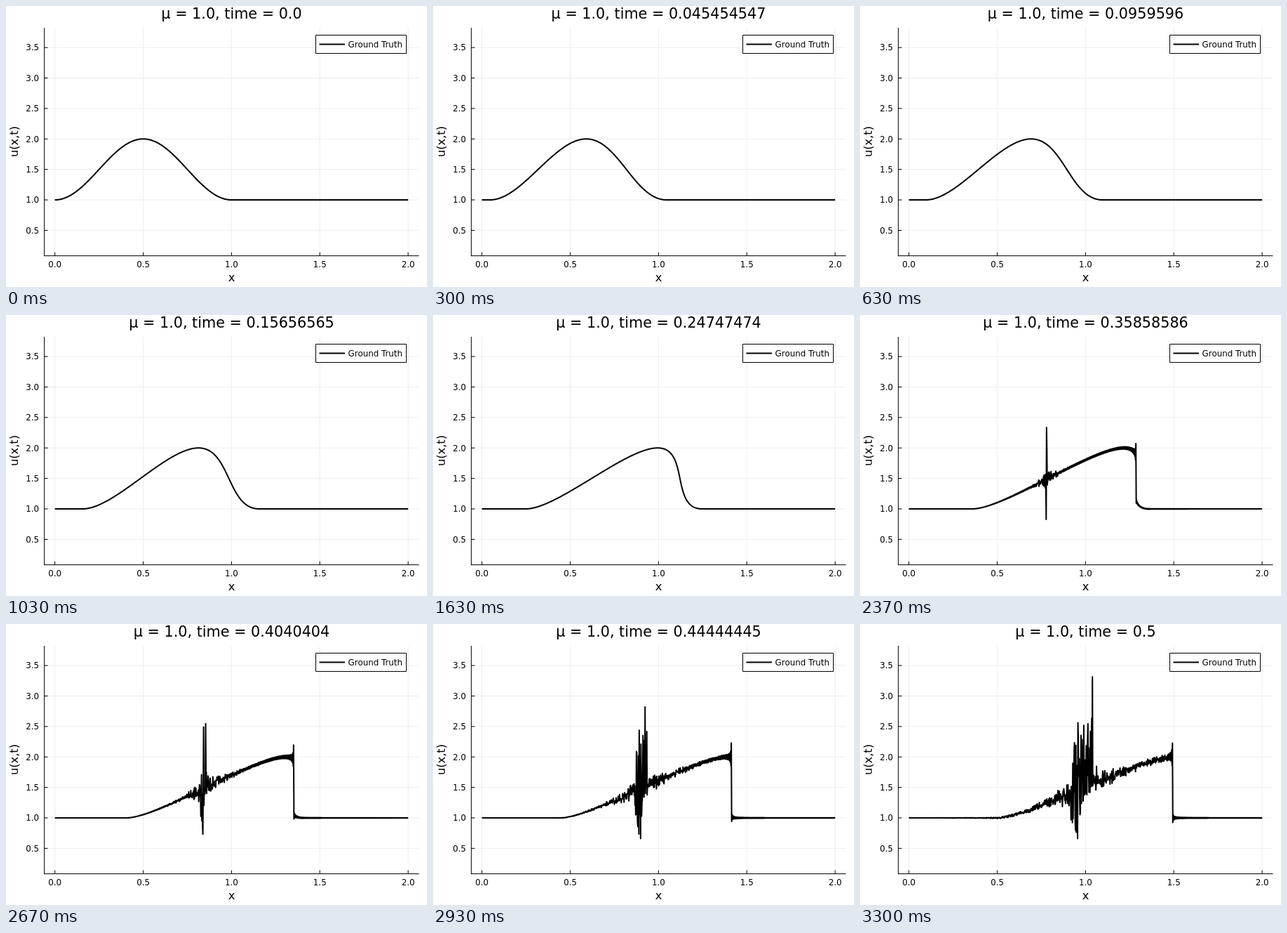
An HTML page with a canvas for the animation above (3330 ms loop, 600 by 400 pixels).

```html
<!DOCTYPE html>
<html lang="en">
<head>
<meta charset="utf-8">
<title>Inviscid wave steepening</title>
<style>
html, body { margin: 0; width: 100%; height: 100%; overflow: hidden; background: #fff; }
canvas { display: block; }
</style>
</head>
<body>
<canvas id="stage" width="600" height="400"></canvas>
<script>
const ctx = document.getElementById('stage').getContext('2d');
const LOOP = 3330, LAST = 99, SAMPLES = 1024;
const DX = 2 / SAMPLES, BREAK_TIME = 1 / Math.PI;
const BOX = { left: 54.6, right: 588.5, top: 31, bottom: 355.6 };

const px = x => 69.7 + 251.7 * x;
const py = u => 276 - 86.75 * (u - 1);

function line(x1, y1, x2, y2, color = '#000', width = 1) {
  ctx.strokeStyle = color;
  ctx.lineWidth = width;
  ctx.beginPath();
  ctx.moveTo(x1, y1);
  ctx.lineTo(x2, y2);
  ctx.stroke();
}

function label(text, x, y, size, align = 'center') {
  ctx.font = `${size}px "DejaVu Sans", sans-serif`;
  ctx.textAlign = align;
  ctx.fillStyle = '#000';
  ctx.fillText(text, x, y);
}

// Shortest decimal that still identifies the single-precision value.
function formatSingle(value) {
  const single = Math.fround(value);
  let digits = 1;
  while (Math.fround(+single.toPrecision(digits)) !== single) digits++;
  const text = String(+single.toPrecision(digits));
  return text.includes('.') ? text : text + '.0';
}

// Repeatable noise in [-1, 1].
function noise(i, seed) {
  const v = Math.sin(i * 12.9898 + seed * 78.233) * 43758.5453;
  return 2 * (v - Math.floor(v)) - 1;
}

const initial = x => x > 0 && x < 1 ? 1 + 0.5 * (1 - Math.cos(2 * Math.PI * x)) : 1;

// Burgers solution: follow the characteristic through x back to its foot.
function wave(x, t, shock) {
  let lo = x < shock ? x - 2 * t : 0.75;
  let hi = x < shock ? 0.75 : x - t;
  for (let i = 0; i < 40; i++) {
    const mid = (lo + hi) / 2;
    if (mid + initial(mid) * t < x) lo = mid; else hi = mid;
  }
  return initial((lo + hi) / 2);
}

// Ringing on both sides of the discontinuity, plus ripple along the hump.
function ringing(x, u, shock, jump) {
  const n = Math.floor(Math.abs(x - shock) / DX);
  const sign = n % 2 ? -1 : 1;
  if (x >= shock) return -sign * 0.075 * jump ** 2 / (1 + n) ** 0.65;
  const ripple = 0.016 * Math.min(1, 2 * (u - 1));
  return sign * jump * (0.23 / (1 + n) ** 0.9 + ripple);
}

// Unstable burst riding on the rising flank.
function makeBurst(t, s, frame) {
  const center = 0.242 + 1.5 * t - 0.018 * s * s;
  const half = 0.066 * s ** 1.7;
  const strength = 1 - Math.exp(-((s / 0.13) ** 2));
  const spread = s ** 1.5;
  const peakIndex = Math.round((center + s * half) / DX);
  const dipIndex = Math.min(peakIndex - 1, Math.round((center - 0.3 * half) / DX));

  return (x, i) => {
    if (i === peakIndex) return strength * (0.87 + 0.88 * s * s);
    if (i === dipIndex) return -strength * (0.69 + 0.08 * s);
    const q = (x - center) / half;
    const r = noise(i, frame);
    if (Math.abs(q) < 1) {
      const up = Math.min(1.15, 0.4 + 1.1 * (q + 1));
      const down = q < 0 ? 0.45 + 0.4 * (q + 1) : Math.max(0.15, 0.8 - 2.2 * q);
      return strength * r * (r > 0 ? up : down);
    }
    const gap = Math.abs(x - center) - half;
    const [size, reach] = q < 0
      ? [0.2, 0.012 + 0.13 * spread]
      : [0.17, 0.012 + 0.22 * spread];
    const rare = noise(i + 0.5, frame) > 0.97 ? 1.7 : 1;
    return strength * r * Math.sqrt(Math.abs(r)) * rare * size * Math.exp(-gap / reach);
  };
}

function drawCurve(t, frame) {
  const s = Math.max(0, (t - BREAK_TIME) / (0.5 - BREAK_TIME));
  const shock = 0.75 + 1.5 * t - 0.007 * s ** 1.3;
  const jump = s && wave(shock - 1e-6, t, shock) - wave(shock + 1e-6, t, shock);
  const burst = makeBurst(t, s, frame);
  ctx.beginPath();
  for (let i = 0; i <= SAMPLES; i++) {
    const x = i * DX;
    let u = wave(x, t, shock);
    if (s) u += ringing(x, u, shock, jump) + (x < shock ? burst(x, i) : 0);
    ctx.lineTo(px(x), py(u));
  }
  ctx.strokeStyle = '#000';
  ctx.lineWidth = 2;
  ctx.lineJoin = 'round';
  ctx.stroke();
}

function drawAxes() {
  const { left, right, top, bottom } = BOX;
  const xTicks = [0, 0.5, 1, 1.5, 2];
  const yTicks = [0.5, 1, 1.5, 2, 2.5, 3, 3.5];
  const grid = 'rgba(0,0,0,0.07)';
  for (const x of xTicks) {
    line(px(x), top, px(x), bottom, grid);
    line(px(x), bottom, px(x), bottom - 5);
    label(x.toFixed(1), px(x), 371.7, 11.85);
  }
  for (const u of yTicks) {
    line(left, py(u), right, py(u), grid);
    line(left, py(u), left + 5, py(u));
    label(u.toFixed(1), 47, py(u) + 4.3, 11.85, 'right');
  }
  line(left, top, left, bottom + 0.5);
  line(left - 0.5, bottom, right, bottom);
  label('x', 321.5, 392, 16.3);
  ctx.save();
  ctx.translate(16.5, 193);
  ctx.rotate(-Math.PI / 2);
  label('u(x,t)', 0, 0, 16.3);
  ctx.restore();
}

function drawLegend() {
  ctx.fillStyle = '#fff';
  ctx.fillRect(441.5, 41.5, 129, 26);
  ctx.strokeStyle = '#000';
  ctx.lineWidth = 1;
  ctx.strokeRect(441.5, 41.5, 129, 26);
  line(446.5, 54.5, 483, 54.5, '#000', 2);
  label('Ground Truth', 487.6, 59, 11.85, 'left');
}

function draw(frame) {
  const t = 0.5 * frame / LAST;
  ctx.fillStyle = '#fff';
  ctx.fillRect(0, 0, 600, 400);
  drawAxes();
  drawCurve(t, frame);
  drawLegend();
  label(`μ = 1.0, time = ${formatSingle(t)}`, 321.5, 18, 20.74);
}

const start = performance.now();
let shown = -1;
function tick() {
  const ticks = Math.floor(((performance.now() - start) % LOOP) / 10);
  const frame = Math.min(LAST, Math.floor(0.3 * ticks + 0.15));
  if (frame !== shown) draw(shown = frame);
  requestAnimationFrame(tick);
}
tick();
</script>
</body>
</html>
```
